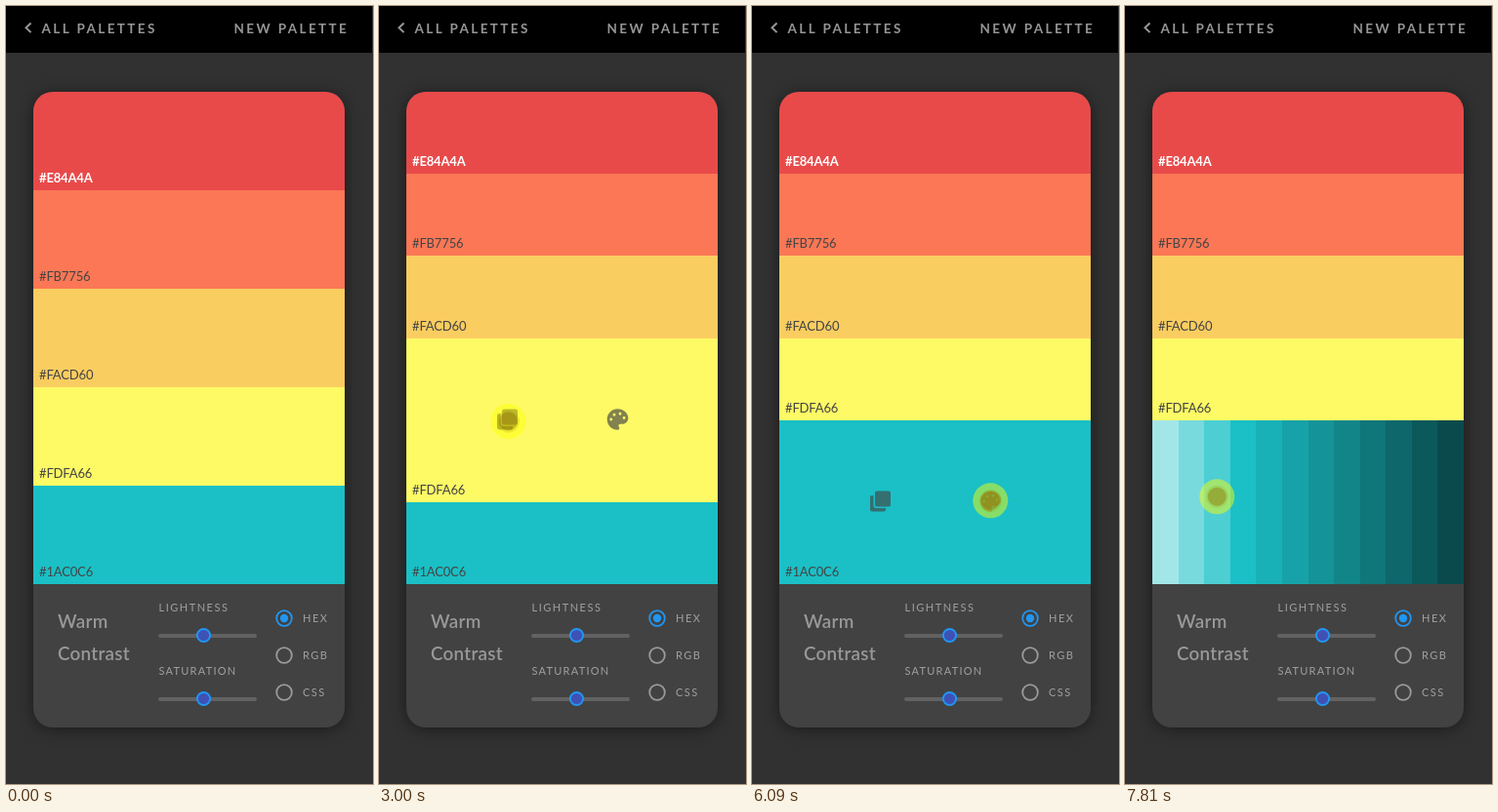
Write an HTML page that moves like this. It is 376 px wide and 798 px high and loops after 8000 ms.

```html
<!DOCTYPE html>
<html lang="en">
<head>
<meta charset="utf-8">
<title>Palette</title>
<style>
html, body { margin: 0; width: 100%; height: 100%; overflow: hidden; background: #313131; }
svg { display: block; font-family: Lato, "Open Sans", sans-serif; }
.card { fill: #424242; filter: drop-shadow(0 2px 8px rgba(0, 0, 0, .45)); }
.nav { font-size: 13.5px; font-weight: 700; letter-spacing: 2.4px; fill: #969696; }
.name { font-size: 18.8px; font-weight: 600; letter-spacing: .3px; fill: #989898; }
.small { font-size: 11px; letter-spacing: 1.5px; fill: #a0a0a0; }
.code { font-size: 13px; letter-spacing: -.15px; fill: #444; }
.code.light { fill: #fff; font-weight: 700; }
.icon { fill: #444; fill-rule: evenodd; }
</style>
</head>
<body>
<svg id="stage" width="376" height="798" viewBox="0 0 376 798">
  <defs>
    <clipPath id="round"><rect x="28" y="88" width="319" height="652" rx="20"/></clipPath>
    <path id="copy" d="M-3.5-10.5h12q2 0 2 2v12q0 2-2 2h-12q-2 0-2-2v-12q0-2 2-2z
      M-10.5-4q0-2 2-2H-7V4q0 3 3 3H5.5V8.5q0 2-2 2H-8.5q-2 0-2-2z"/>
    <path id="palette" transform="scale(1.2) translate(-12 -12)" d="M12 3c-4.97 0-9 4.03-9 9s4.03 9 9 9c.83 0 1.5-.67 1.5-1.5
      0-.39-.15-.74-.39-1.01-.23-.26-.38-.61-.38-.99 0-.83.67-1.5 1.5-1.5H16c2.76 0 5-2.24 5-5 0-4.42-4.03-8-9-8z
      M5.2 12a1.2 1.2 0 1 0 2.4 0a1.2 1.2 0 1 0-2.4 0z M7.9 8a1.2 1.2 0 1 0 2.4 0a1.2 1.2 0 1 0-2.4 0z
      M12.9 7.2a1.2 1.2 0 1 0 2.4 0a1.2 1.2 0 1 0-2.4 0z M16.3 10.7a1.2 1.2 0 1 0 2.4 0a1.2 1.2 0 1 0-2.4 0z"/>
  </defs>
  <rect width="375" height="48"/>
  <path d="M25.5 17.5l-5 4.8 5 4.8" fill="none" stroke="#969696" stroke-width="2"/>
  <text class="nav" x="36.5" y="28">ALL PALETTES</text>
  <text class="nav" x="233.5" y="28">NEW PALETTE</text>
  <rect class="card" x="28" y="88" width="319" height="652" rx="20"/>
  <g id="rows" clip-path="url(#round)"></g>
  <g id="shades"></g>
  <g id="labels"></g>
  <g id="icons"></g>
  <g id="banner">
    <rect x="28" y="479" width="319" height="30" fill="#fff" opacity=".3"/>
    <text x="150" y="500" font-size="14" letter-spacing=".4" fill="#444">COPIED</text>
    <path d="M212 495l4 4 8-8.5" fill="none" stroke="#21b52a" stroke-width="3"/>
  </g>
  <text class="name" x="53" y="638">Warm</text>
  <text class="name" x="53" y="671">Contrast</text>
  <text class="small" x="156.5" y="621">LIGHTNESS</text>
  <text class="small" x="156.5" y="686" style="letter-spacing:1.25px">SATURATION</text>
  <g id="controls"></g>
  <g id="pointer">
    <circle id="halo" r="18" fill="#ff0" opacity=".47"/>
    <circle id="ring" r="11.5"/>
    <circle id="dot" r="9.5"/>
  </g>
</svg>
<script>
const LOOP = 8000, LEFT = 28, TOP = 88, WIDTH = 319, HEIGHT = 505;
const COLORS = ['#E84A4A', '#FB7756', '#FACD60', '#FDFA66', '#1AC0C6'];
const $ = id => document.getElementById(id);

function add(parent, tag, attrs, text) {
  const el = document.createElementNS('http://www.w3.org/2000/svg', tag);
  set(el, attrs);
  if (text) el.textContent = text;
  return parent.appendChild(el);
}
function set(el, attrs) {
  for (const k in attrs) el.setAttribute(k, attrs[k]);
}

// Progress in n equal jumps, the first at t0 and the last at t1
function jumps(t, t0, t1, n) {
  if (t < t0) return 0;
  const gap = (t1 - t0) / (n - 1);
  return Math.min(1, (Math.floor((t - t0) / gap + 0.02) + 1) / n);
}
const smooth = p => p * p * (3 - 2 * p);
const within = (t, a, b) => t >= a && t < b;

const rows = COLORS.map(fill => add($('rows'), 'rect', { x: LEFT, width: WIDTH, fill }));
const labels = COLORS.map((c, i) =>
  add($('labels'), 'text', { class: i ? 'code' : 'code light', x: 34 }, c));
const copyIcon = add($('icons'), 'use', { href: '#copy', class: 'icon' });
const paletteIcon = add($('icons'), 'use', { href: '#palette', class: 'icon' });

// Twelve tints and shades of the last colour
for (let i = 0; i < 12; i++) {
  const target = i < 3 ? 255 : 0;
  const amount = i < 3 ? 0.6 - i * 0.19 : (i - 3) * 0.077;
  const mix = [26, 192, 198].map(v => Math.round(v + (target - v) * amount));
  const edge = k => Math.round(LEFT + k * WIDTH / 12);
  add($('shades'), 'rect', {
    x: edge(i), y: 425, width: edge(i + 1) - edge(i), height: 168, fill: `rgb(${mix})`
  });
}

for (const y of [646, 711]) {
  add($('controls'), 'rect', { x: 156, y: y - 2, width: 101, height: 4, rx: 2, fill: '#626262' });
  add($('controls'), 'circle', {
    cx: 202.5, cy: y - 0.5, r: 6.6, fill: '#3f51b5', stroke: '#2196f3', 'stroke-width': 2
  });
}
['HEX', 'RGB', 'CSS'].forEach((name, i) => {
  const cy = 628 + i * 38, stroke = i ? '#9a9a9a' : '#2196f3';
  add($('controls'), 'circle', { cx: 285, cy, r: 7.8, fill: 'none', stroke, 'stroke-width': 1.8 });
  if (!i) add($('controls'), 'circle', { cx: 285, cy, r: 4.2, fill: stroke });
  add($('controls'), 'text', { class: 'small', x: 304, y: cy + 3.5 }, name);
});

// start, end, jumps, then four Bezier points
const MOVES = [
  [860, 1130, 5, [352, 467], [337, 456], [323, 445], [308.5, 434.5]],
  [2270, 2740, 8, [308.5, 434.5], [250, 414.5], [191, 412], [132.5, 426]],
  [3680, 4180, 8, [132.5, 426], [210, 402], [325, 420], [292.3, 545.3]],
  [5110, 5430, 6, [292.3, 545.3], [280, 530], [262, 514], [244.3, 507.3]],
  [6560, 7220, 11, [244.3, 507.3], [195, 512], [145, 506], [94.3, 503.3]]
];
const CLICKS = [[1480, 1740], [3000, 3200], [4380, 4640], [6090, 6290], [7810, LOOP]];

function pointerAt(t) {
  const move = MOVES.filter(m => t >= m[0]).pop();
  if (!move) return null;
  const [t0, t1, n, a, b, c, d] = move;
  const p = smooth(jumps(t, t0, t1, n)), q = 1 - p;
  return [0, 1].map(k =>
    q * q * q * a[k] + 3 * q * q * p * b[k] + 3 * q * p * p * c[k] + p * p * p * d[k]);
}

function drawRows(t) {
  const open = jumps(t, 1740, 1800, 2), swap = jumps(t, 4640, 4710, 2);
  const grow = [1, 1, 1, 1 + open - swap, 1 + swap];
  const total = grow.reduce((s, g) => s + g);
  let y = TOP;
  return grow.map((g, i) => {
    const end = y + HEIGHT * g / total;
    const top = Math.round(y), bottom = Math.round(end);
    set(rows[i], { y: top, height: bottom - top });
    set(labels[i], { y: bottom - 8.5 });
    y = end;
    return (top + bottom) / 2;
  });
}

function placeIcon(el, x, y, active) {
  set(el, { transform: `translate(${x} ${y}) scale(${active ? 1.08 : 1})`, opacity: active ? 1 : 0.66 });
}

function draw(t) {
  const centers = drawRows(t);
  const last = t >= 4640;
  const iconY = centers[last ? 4 : 3] - 1;
  placeIcon(copyIcon, 131.5, iconY, within(t, 3200, 4640));
  placeIcon(paletteIcon, 244.5, iconY, t >= 6290);

  const fade = 1 - jumps(t, 6560, 6690, 3);
  set($('icons'), { opacity: t < 1740 ? 0 : fade });
  set(labels[4], { opacity: fade });
  set($('shades'), { opacity: jumps(t, 6360, 6620, 5) });

  const copied = jumps(t, 3400, 3540, 3) - jumps(t, 4310, 4440, 3);
  set($('banner'), { opacity: copied });
  set(labels[3], { opacity: 1 - 0.3 * copied });

  const pos = pointerAt(t);
  set($('pointer'), { visibility: pos ? 'visible' : 'hidden' });
  if (!pos) return;
  const pressed = CLICKS.some(([a, b]) => within(t, a, b));
  set($('pointer'), { transform: `translate(${pos})` });
  set($('halo'), { 'fill-opacity': pressed ? 1 : 0 });
  set($('ring'), { fill: pressed ? 'rgba(140,130,0,.16)' : 'rgba(60,60,60,.27)' });
  set($('dot'), { fill: pressed ? 'rgba(140,105,0,.38)' : 'rgba(25,25,25,.3)' });
}

const start = performance.now();
function tick() {
  draw((performance.now() - start) % LOOP);
  requestAnimationFrame(tick);
}
tick();
</script>
</body>
</html>
```
